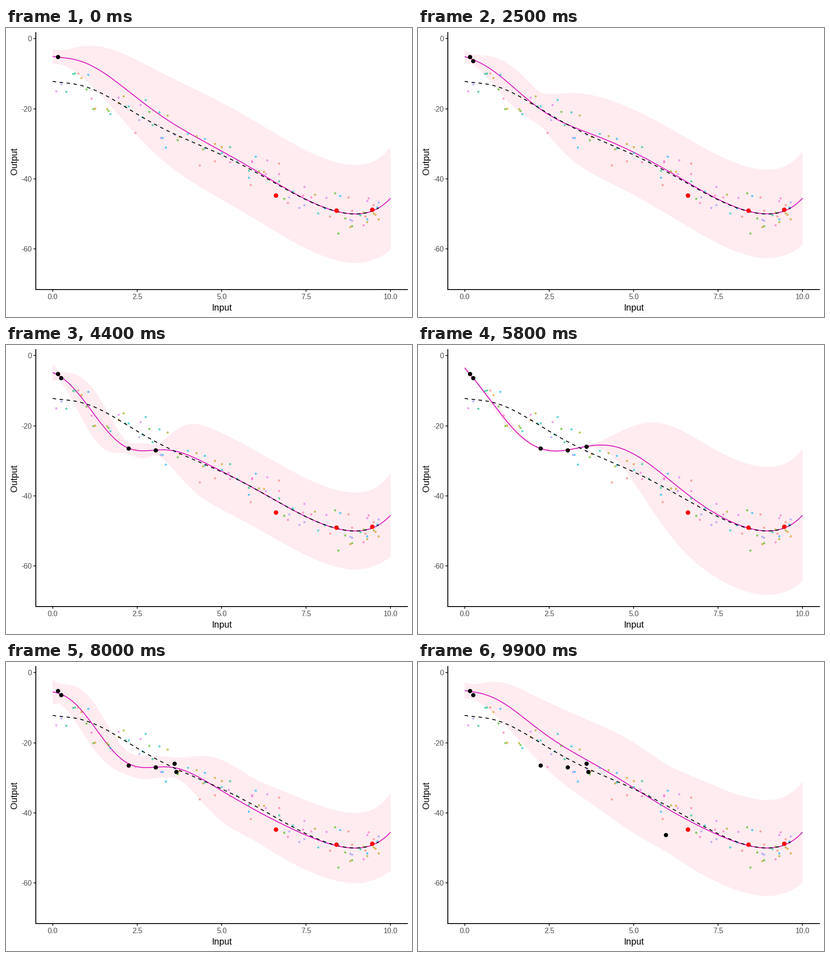
These frames come from a looping animation (885x632 px, 10000 ms). A matplotlib script:

```python
import numpy as np
import matplotlib.pyplot as plt
from matplotlib.animation import FuncAnimation
from matplotlib.patches import Polygon

W, H, DPI = 885, 632, 100
LEFT, RIGHT, TOP, BOTTOM = 64.9, 875.1, 9.9, 572
FRAMES, INTERVAL = 100, 100
STARTS = [8, 23, 38, 52, 66, 80, 94]   # first frame of each transition
STEPS = 7


def px(n):
    """Pixels to points."""
    return n * 72 / DPI


plt.rcParams.update({"font.family": "Liberation Sans", "axes.unicode_minus": False})

# Prior mean: the polynomial through a few key points
KEY_X = [0, 0.5, 1.5, 3, 4.5, 6, 7.5, 9, 9.5, 10]
KEY_Y = [-12.2, -12.75, -15.85, -24.3, -31, -38.05, -45.95, -50, -49, -45.5]
prior = np.polynomial.Polynomial.fit(KEY_X, KEY_Y, len(KEY_X) - 1)

# Observations, added one at a time
OBS_X = np.array([0.15, 0.25, 2.25, 3.05, 3.6, 3.65, 5.95])
OBS_Y = np.array([-5.2, -6.4, -26.5, -26.9, -25.9, -28.3, -46.2])
TEST = [(6.6, 8.4, 9.45), (-44.75, -49.0, -48.7)]

# Amplitude, length scale and noise, refitted after each observation
KERNELS = [(13.9, 2.5, 1.4), (12.5, 3.2, 1.3), (12.6, 1.0, 1.0), (10.9, 0.86, 1.15),
           (18.25, 1.5, 0.15), (9.4, 0.9, 2.4), (11.65, 1.05, 2.7)]

grid = np.linspace(0, 10, 201)


def posterior(count):
    """Mean, lower and upper bound of the process given the first observations."""
    amp, length, noise = KERNELS[count - 1]
    x, y = OBS_X[:count], OBS_Y[:count]

    def kernel(a, b):
        return amp**2 * np.exp(-(a[:, None] - b[None, :])**2 / (2 * length**2))

    cross = kernel(grid, x)
    gain = np.linalg.solve(kernel(x, x) + noise**2 * np.eye(count), cross.T).T
    mean = prior(grid) + gain @ (y - prior(x))
    edge = 20 * (np.clip(grid - 9.3, 0, None) / 0.7)**2
    half = np.sqrt(amp**2 - (gain * cross).sum(axis=1) + noise**2 + edge)
    return np.array([mean, mean - half, mean + half])


states = [posterior(k + 1) for k in range(len(OBS_X))]

fig = plt.figure(figsize=(W / DPI, H / DPI), dpi=DPI, facecolor="white")
ax = fig.add_axes([LEFT / W, 1 - BOTTOM / H, (RIGHT - LEFT) / W, (BOTTOM - TOP) / H])
ax.set_xlim(-0.5, 10.5)
ax.set_ylim(-71.55, 1.73)
ax.set_xticks(np.arange(0, 10.1, 2.5))
ax.xaxis.set_major_formatter("{x:.1f}")
ax.set_yticks(range(-60, 1, 20))
ax.tick_params(length=px(5), width=px(1.9), pad=px(4), color="#333333",
               labelcolor="#4D4D4D", labelsize=px(15.9))
for side, spine in ax.spines.items():
    spine.set_visible(side in ("left", "bottom"))
    spine.set_linewidth(px(1.9))
title = dict(fontsize=px(19.9), ha="center", va="baseline", rotation_mode="anchor")
fig.text((LEFT + RIGHT) / 2 / W, 1 - 618 / H, "Input", **title)
fig.text(24.3 / W, 1 - (TOP + BOTTOM) / 2 / H, "Output", rotation=90, **title)

ribbon = ax.add_patch(Polygon([(0, 0)] * 3, facecolor="#FEECF0", edgecolor="none", zorder=1))
line, = ax.plot([], [], color="#DB15C1", lw=px(1.9), solid_capstyle="butt", zorder=2)

# Ten individuals, each scattered around the prior mean with its own offset
HUES = ["#F8766D", "#D89000", "#A3A500", "#39B600", "#00BF7D",
        "#00BFC4", "#00B0F6", "#9590FF", "#E76BF3", "#FF62BC"]
rng = np.random.default_rng(4)
for hue in HUES:
    x = rng.choice(194, 10, replace=False) * 0.05
    y = prior(x) + rng.normal(0, 1.3) + rng.normal(-0.3, 3, 10).clip(-6, 6)
    ax.scatter(x, y, s=px(3.6)**2, color=hue, alpha=0.5, linewidths=px(1.3), zorder=3)

seen = grid[grid <= 9.66]
ax.plot(seen, prior(seen), color="black", lw=px(1.9), dashes=(4, 4),
        dash_capstyle="butt", zorder=4)
marker = dict(ls="none", marker="o", mew=0)
ax.plot(*TEST, color="red", ms=px(9.8), zorder=5, **marker)
points, = ax.plot([], [], color="black", ms=px(9.3), zorder=6, **marker)


def update(n):
    begun = [s for s in STARTS if n >= s]
    now = max(len(begun) - 1, 0)
    after = (now + 1) % len(states)
    t = min((n - begun[-1] + 1) / STEPS, 1) if begun else 0
    mean, low, high = states[now] * (1 - t) + states[after] * t
    count = (after if t == 1 else now) + 1

    line.set_data(grid, mean)
    ribbon.set_xy(np.column_stack([np.r_[grid, grid[::-1]], np.r_[high, low[::-1]]]))
    points.set_data(OBS_X[:count], OBS_Y[:count])
    return ribbon, line, points


anim = FuncAnimation(fig, update, frames=FRAMES, interval=INTERVAL, repeat=True, repeat_delay=0)
plt.show()
```
